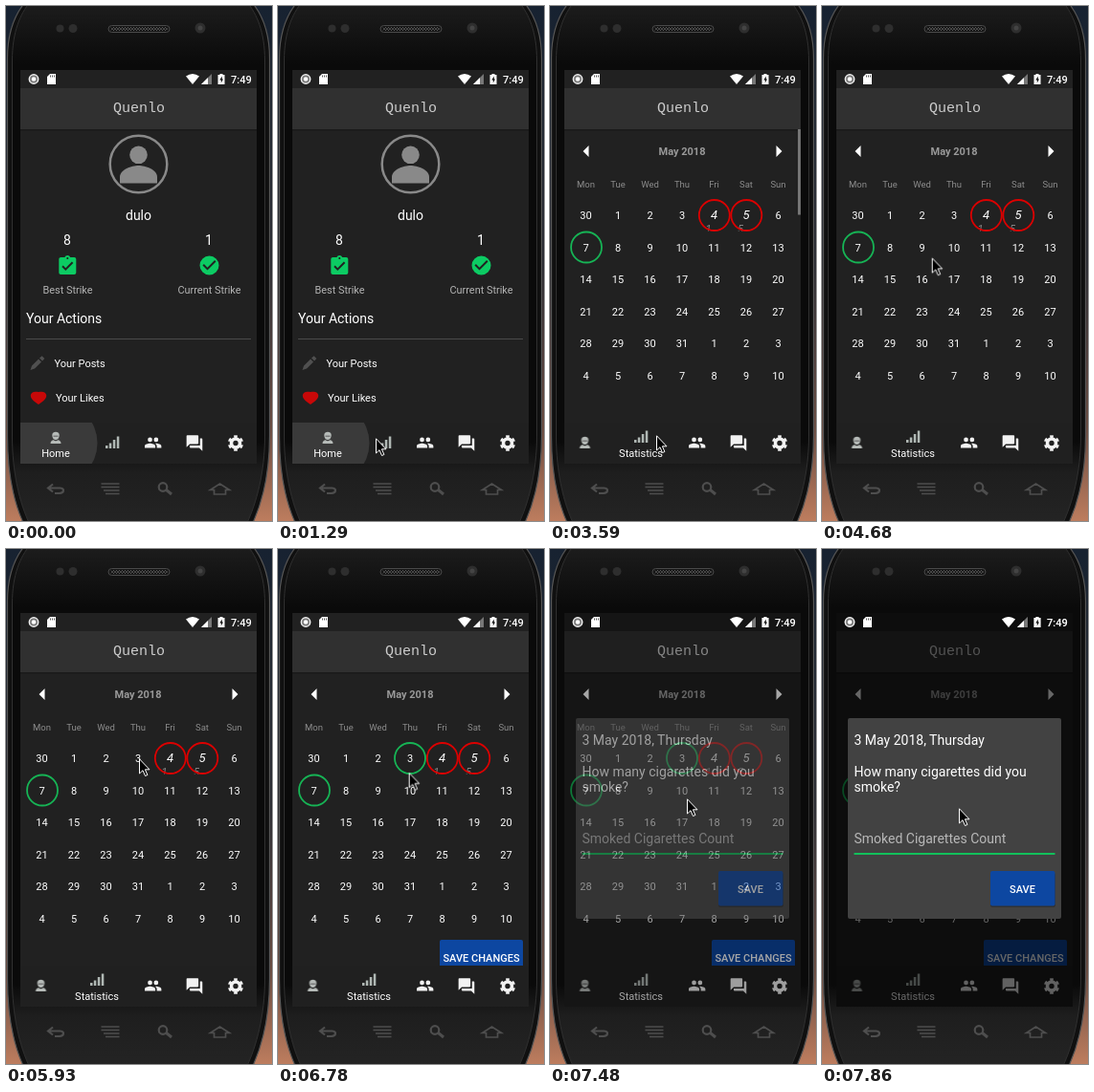
These frames come from a looping animation (278 px wide and 539 px high, 8 s). An HTML page:

```html
<!DOCTYPE html>
<html lang="en">
<head>
<meta charset="utf-8">
<title>Habit tracker demo</title>
<style>
html, body { margin: 0; width: 100%; height: 100%; overflow: hidden; background: #000; }
svg { display: block; width: 100vw; height: 100vh; }
text { font-family: Roboto, "Noto Sans", sans-serif; font-size: 14px; fill: #fff; }
.mid { text-anchor: middle; }
.small { font-size: 11px; }
.strong { font-weight: 500; font-size: 11px; }
.label { font-size: 10.9px; fill: #b4b4b4; }
.brand { font-family: "Liberation Mono", "DejaVu Sans Mono", monospace; font-size: 15px; fill: #ccc; }
.key { fill: none; stroke: #4e4e4e; stroke-width: 2.2; }
.ring { fill: none; stroke-width: 1.8; }

.anim { animation: 8s step-end infinite; }
#cursor { animation-name: cursor; }
#held { animation-name: held; }
#profile { animation-name: leave; }
#calendar { animation-name: enter; }
#bar { animation-name: bar; }
#chosen, #save { animation-name: chosen; }
#dialog { animation-name: dialog; }
#homeIcon { animation-name: homeIcon; }
#statIcon { animation-name: statIcon; }
#homeText { animation-name: homeText; }
#statText { animation-name: statText; }
#ripple { animation-name: ripple; transform-box: fill-box; transform-origin: center; }

@keyframes cursor {
  0% { transform: translate(204px, 551px); }
  9.2% { transform: translate(204px, 551px); animation-timing-function: steps(8, start); }
  17% { transform: translate(102px, 452px); }
  20.7% { transform: translate(102px, 452px); animation-timing-function: steps(2, start); }
  22.6% { transform: translate(112px, 458px); }
  25.6% { transform: translate(112px, 458px); animation-timing-function: steps(3, start); }
  28.4% { transform: translate(118px, 473px); }
  34.3% { transform: translate(118px, 461px); }
  38.2% { transform: translate(118px, 461px); animation-timing-function: steps(4, start); }
  42% { transform: translate(111px, 452px); }
  44.8% { transform: translate(111px, 449px); }
  45.8% { transform: translate(111px, 449px); animation-timing-function: steps(3, start); }
  48.6% { transform: translate(105px, 278px); }
  57.4% { transform: translate(105px, 278px); animation-timing-function: steps(8, start); }
  65.1% { transform: translate(144px, 219px); }
  72.05% { transform: translate(144px, 219px); animation-timing-function: steps(3, start); }
  74.9% { transform: translate(139px, 219px); }
  79.8% { transform: translate(138px, 221px); }
  83.7% { transform: translate(138px, 221px); animation-timing-function: steps(3, start); }
  86.5% { transform: translate(136px, 240px); }
  90.56% { transform: translate(136px, 240px); animation-timing-function: steps(3, start); }
  93.4% { transform: translate(143px, 261px); }
  98.2%, 100% { transform: translate(143px, 271px); }
}
@keyframes held {
  0% { opacity: 1; }
  21.7% { opacity: .7; }
  22.7% { opacity: .4; }
  23.6%, 100% { opacity: 0; }
}
@keyframes leave { 0% { opacity: 1; } 37.2%, 100% { opacity: 0; } }
@keyframes enter { 0% { opacity: 0; } 37.2%, 100% { opacity: 1; } }
@keyframes bar {
  0% { opacity: 1; }
  50.8% { opacity: .65; }
  51.8% { opacity: .3; }
  52.7%, 100% { opacity: 0; }
}
@keyframes chosen { 0% { opacity: 0; } 79.8% { opacity: .6; } 80.8%, 100% { opacity: 1; } }
@keyframes dialog {
  0% { opacity: 0; }
  91.5% { opacity: .1; }
  92.4% { opacity: .3; }
  93.4% { opacity: .58; }
  94.4% { opacity: .8; }
  95.3% { opacity: .93; }
  96.3%, 100% { opacity: 1; }
}
@keyframes homeIcon {
  0% { transform: translate(52px, 452px); }
  35.3% { transform: translate(52px, 452px); animation-timing-function: steps(3, start); }
  38.2%, 100% { transform: translate(36.5px, 457px); }
}
@keyframes statIcon {
  0% { transform: translate(111px, 457px); }
  35.3% { transform: translate(111px, 457px); animation-timing-function: steps(3, start); }
  38.2%, 100% { transform: translate(95px, 451px); }
}
@keyframes homeText { 0% { opacity: 1; } 35.3% { opacity: .4; } 36.2%, 100% { opacity: 0; } }
@keyframes statText { 0% { opacity: 0; } 36.2% { opacity: .5; } 37.2%, 100% { opacity: 1; } }
@keyframes ripple {
  0% { opacity: 0; transform: scale(.5); }
  34.3% { opacity: .08; transform: scale(.6); animation-timing-function: steps(4, start); }
  38.2% { opacity: .8; transform: scale(1); animation-timing-function: steps(3, start); }
  41.1%, 100% { opacity: 0; transform: scale(1); }
}
</style>
</head>
<body>
<svg viewBox="0 0 278 539" preserveAspectRatio="none">
  <defs>
    <linearGradient id="sky" x2="0" y2="1">
      <stop offset="0" stop-color="#172231"/>
      <stop offset=".12" stop-color="#1c2430"/>
      <stop offset=".5" stop-color="#2b2c33"/>
      <stop offset=".82" stop-color="#6b4c42"/>
      <stop offset="1" stop-color="#bd7d5e"/>
    </linearGradient>
    <linearGradient id="shell" x2="0" y2="1">
      <stop offset="0" stop-color="#1d1d1d"/>
      <stop offset=".12" stop-color="#0a0a0a"/>
      <stop offset=".84" stop-color="#0a0a0a"/>
      <stop offset=".9" stop-color="#1e1e1e"/>
      <stop offset="1" stop-color="#242424"/>
    </linearGradient>
    <pattern id="mesh" width="3" height="3" patternUnits="userSpaceOnUse">
      <path d="M0 0L3 3M3 0L0 3" stroke="#666" stroke-width=".6"/>
    </pattern>
    <clipPath id="navClip"><path d="M15 436H262V479H15z"/></clipPath>
    <clipPath id="pageClip"><path d="M15 129H262V436H15z"/></clipPath>
    <clipPath id="rowClip"><path d="M15 200H262V235.5H15z"/></clipPath>
    <g id="status" fill="#fff">
      <circle cx="29" cy="76.500" r="4.700" fill="#777" stroke="#eee" stroke-width="1.500"/>
      <circle cx="29" cy="76.500" r="2.300"/>
      <path d="M46 71H52V82H43V74z"/>
      <path d="M46.500 72.500V74.500M48.500 72.500V74.500M50.500 72.500V74.500" stroke="#333" stroke-width=".8"/>
      <path d="M195 82L188 73.500Q195 68.500 202 73.500z"/>
      <path d="M215 71V82H204z" fill="#777"/><path d="M211 75V82H204z"/>
      <path d="M221.500 72H223.500V71H226.500V72H228.500V82H221.500z"/>
      <path d="M225.800 73.500L223.300 77.500H224.800V80.500L227 76.500H225.800z" fill="#111"/>
      <text class="strong" x="235" y="80.500">7:49</text>
    </g>
  </defs>

  <!-- phone -->
  <rect width="278" height="539" fill="url(#sky)"/>
  <path d="M20 -4C10 8 1.500 25 1.500 55V450C1.500 490 9 522 19 543H257C267 522 275.500 490 275.500 450V55C275.500 25 267 8 257 -4z" fill="#101010" stroke="#555" stroke-width="1.200"/>
  <path d="M25 -4C15 8 6.500 27 6.500 57V450C6.500 488 14 520 25 543H251C262 520 270.500 488 270.500 450V57C270.500 27 262 8 252 -4z" fill="url(#shell)" stroke="#303030"/>
  <rect x="107" y="20.500" width="64" height="7" rx="3.500" fill="#151515" stroke="#4a4a4a"/>
  <rect x="109" y="22" width="60" height="4" rx="2" fill="url(#mesh)"/>
  <g fill="#2e2e2e">
    <circle cx="56.500" cy="23.500" r="4"/><circle cx="70" cy="23.500" r="4.500"/>
    <circle cx="203" cy="23" r="5.500"/><circle cx="203" cy="23" r="2.500" fill="#444"/>
  </g>
  <g class="key">
    <path d="M49 500.500L44 504.500L49 508.500M44.500 504.500H56Q60 504.500 60 507T56 510H51"/>
    <path d="M99.500 500H118.500M99.500 503.500H118.500M102 507H118.500M104 510.500H118.500" stroke-width="1.700"/>
    <circle cx="164" cy="503.500" r="4.300"/><path d="M167.500 506.500L173 511" stroke-width="3"/>
    <path d="M213.500 506.500L223.500 500L233.500 506.500H229.500V511H217.500V506.500z" stroke-width="1.700"/>
  </g>

  <!-- screen -->
  <rect x="15" y="67" width="247" height="412" fill="#212121"/>
  <use href="#status"/>
  <rect x="15" y="86" width="247" height="43" fill="#303030"/>
  <rect x="15" y="129" width="247" height="1.500" fill="#000" opacity=".25"/>
  <text class="brand mid" x="139" y="111">Quenlo</text>

  <g id="profile" class="anim">
    <circle cx="138.500" cy="165.500" r="29.800" fill="none" stroke="#898989" stroke-width="2.500"/>
    <g fill="#898989">
      <circle cx="138.500" cy="155.800" r="9.300"/>
      <path d="M119 185.500V179C119 171 131.500 167 138.500 167S158 171 158 179V185.500z"/>
    </g>
    <g class="mid">
      <text x="138.500" y="224">dulo</text>
      <text x="64" y="249.500">8</text><text x="212" y="249.500">1</text>
      <text class="label" x="64.500" y="301">Best Strike</text>
      <text class="label" x="212.500" y="301">Current Strike</text>
    </g>
    <g fill="#0ccb63">
      <path transform="translate(52.300 260)" d="M19 3h-4.180C14.400 1.840 13.300 1 12 1c-1.300 0-2.400.84-2.820 2H5c-1.100 0-2 .9-2 2v14c0 1.100.9 2 2 2h14c1.100 0 2-.9 2-2V5c0-1.100-.9-2-2-2zm-7 0c.55 0 1 .45 1 1s-.45 1-1 1-1-.45-1-1 .45-1 1-1zm-2 14l-4-4 1.410-1.410L10 14.170l6.590-6.590L18 9l-8 8z"/>
      <path transform="translate(200.500 259.500)" d="M12 2a10 10 0 1 0 0 20a10 10 0 1 0 0-20zm-2 15l-5-5 1.410-1.410L10 14.170l7.590-7.590L19 8l-9 9z"/>
    </g>
    <text x="21" y="331.500">Your Actions</text>
    <path d="M21 348.500H256" stroke="#4a4a4a"/>
    <path d="M25.500 381L27 376.500L34 369.500L37 372.500L30 379.500zM35 368.500L37.500 366.200L40.300 369L38 371.500z" fill="#505050"/>
    <text class="small" x="50.500" y="377.500">Your Posts</text>
    <path d="M34 417C31 415 26 412 25.800 408C25.600 404 30 403 34 404C38 403 42.400 404 42.200 408C42 412 37 415 34 417z" fill="#c80808"/>
    <text class="small" x="52" y="414">Your Likes</text>
  </g>

  <g id="calendar" class="anim" clip-path="url(#pageClip)">
    <path d="M34.500 152L40.500 146V158zM242.500 152L236.500 146V158z" fill="#fff"/>
    <text class="mid" x="138" y="156" style="font-size:11px;font-weight:700;fill:#999">May 2018</text>
    <g id="days" class="mid"></g>
    <g clip-path="url(#rowClip)" font-style="italic">
      <text x="162.500" y="237" style="font-size:11px;fill:#888">1</text>
      <text x="196" y="237" style="font-size:11px;fill:#888">5</text>
    </g>
    <g class="ring">
      <circle cx="38" cy="252.500" r="16" stroke="#16b455"/>
      <circle cx="171.800" cy="219" r="16" stroke="#dc0000"/>
      <circle cx="205.300" cy="219" r="16" stroke="#dc0000"/>
      <circle id="chosen" class="anim" cx="138" cy="219" r="16" stroke="#16b455"/>
    </g>
    <rect id="bar" class="anim" x="259" y="129" width="3" height="89.500" fill="#747474"/>
    <g id="save" class="anim">
      <rect x="169" y="409" width="87" height="36" rx="2" fill="#0d47a1"/>
      <text class="strong mid" x="212.500" y="431.500">SAVE CHANGES</text>
    </g>
  </g>

  <!-- bottom navigation -->
  <g clip-path="url(#navClip)">
    <rect x="15" y="436" width="247" height="43" fill="#202020"/>
    <circle id="held" class="anim" cx="52" cy="457.500" r="43.500" fill="#3a3a3a"/>
    <circle id="ripple" class="anim" cx="111" cy="457.500" r="43.500" fill="#3a3a3a"/>
    <g id="homeIcon" class="anim">
      <path d="M-3.700 -2.500C-4.200 -7.500 4.200 -7.500 3.700 -2.500C3.300 1.200 1.500 2 0 2S-3.300 1.200 -3.700 -2.500zM-5.500 6C-5.500 3.500 -3.700 2.500 -2.300 2.300Q0 4 2.300 2.300C3.700 2.500 5.500 3.500 5.500 6z" fill="#b6bbb8"/>
      <path d="M-2.500 -1.800H2.500" stroke="#6a6a6a" stroke-width="1.200"/>
    </g>
    <text id="homeText" class="small mid anim" x="52" y="471.500">Home</text>
    <path id="statIcon" class="anim" d="M-7 6V3H-4.500V6zM-3.200 6V.5H-.7V6zM.8 6V-3H3.300V6zM4.800 6V-6.500H7.300V6z" fill="#b0b8b4"/>
    <text id="statText" class="small mid anim" x="95" y="471.500">Statistics</text>
    <g fill="#f2f2f2">
      <path transform="translate(144.200 447.600) scale(.79)" d="M16 11a3 3 0 1 0 0-6a3 3 0 1 0 0 6zm-8 0a3 3 0 1 0 0-6a3 3 0 1 0 0 6zm0 2c-2.330 0-7 1.170-7 3.500V19h14v-2.500c0-2.330-4.670-3.500-7-3.500zm8 0c-.29 0-.62.02-.97.05 1.160.84 1.970 1.970 1.970 3.450V19h6v-2.500c0-2.330-4.670-3.500-7-3.500z"/>
      <path transform="translate(187 447.600) scale(.83)" d="M21 6h-2v9H6v2c0 .55.45 1 1 1h11l4 4V7c0-.55-.45-1-1-1zm-4 6V3c0-.55-.45-1-1-1H3c-.55 0-1 .45-1 1v14l4-4h10c.55 0 1-.45 1-1z"/>
    </g>
    <g fill="none" stroke="#f2f2f2">
      <circle cx="240" cy="457.500" r="4.500" stroke-width="3.600"/>
      <circle cx="240" cy="457.500" r="6.900" stroke-width="2.600" pathLength="12" stroke-dasharray="1 1" stroke-dashoffset="-.5"/>
    </g>
  </g>

  <g id="dialog" class="anim">
    <rect x="15" y="67" width="247" height="412" fill="#000" opacity=".6"/>
    <use href="#status"/>
    <rect x="27" y="177" width="223" height="210" rx="2" fill="#424242"/>
    <text x="33.500" y="204.500">3 May 2018, Thursday</text>
    <text x="33.500" y="237.500">How many cigarettes did you</text>
    <text x="33.500" y="254">smoke?</text>
    <text x="33.500" y="308" style="fill:#b8b8b8">Smoked Cigarettes Count</text>
    <path d="M33.500 319H243.500" stroke="#12c05b" stroke-width="2"/>
    <rect x="176" y="339" width="68" height="36" rx="2" fill="#000" opacity=".25"/>
    <rect x="176" y="337" width="67.500" height="36.500" rx="2" fill="#0d47a1"/>
    <text class="strong mid" x="209.500" y="359.500">SAVE</text>
  </g>

  <g id="cursor" class="anim">
    <path d="M.5 .8V16L4 12.700L6.500 18.500L8.900 17.500L6.400 11.800H11z" fill="#000" stroke="#fff"/>
  </g>
</svg>
<script>
const days = document.getElementById('days');

function put(text, col, y, style) {
  const el = document.createElementNS('http://www.w3.org/2000/svg', 'text');
  el.textContent = text;
  el.setAttribute('x', 37.5 + col * 33.5);
  el.setAttribute('y', y);
  el.style.cssText = style;
  days.append(el);
}

['Mon', 'Tue', 'Wed', 'Thu', 'Fri', 'Sat', 'Sun'].forEach((name, col) =>
  put(name, col, 189.5, 'font-size:9.5px;fill:#8c8c8c'));

for (let i = 0; i < 42; i++) {
  const date = new Date(2018, 3, 30 + i).getDate();
  const marked = i === 4 || i === 5;
  put(date, i % 7, 223 + Math.floor(i / 7) * 33.6,
    marked ? 'font-size:13px;font-style:italic' : 'font-size:11px');
}
</script>
</body>
</html>
```
